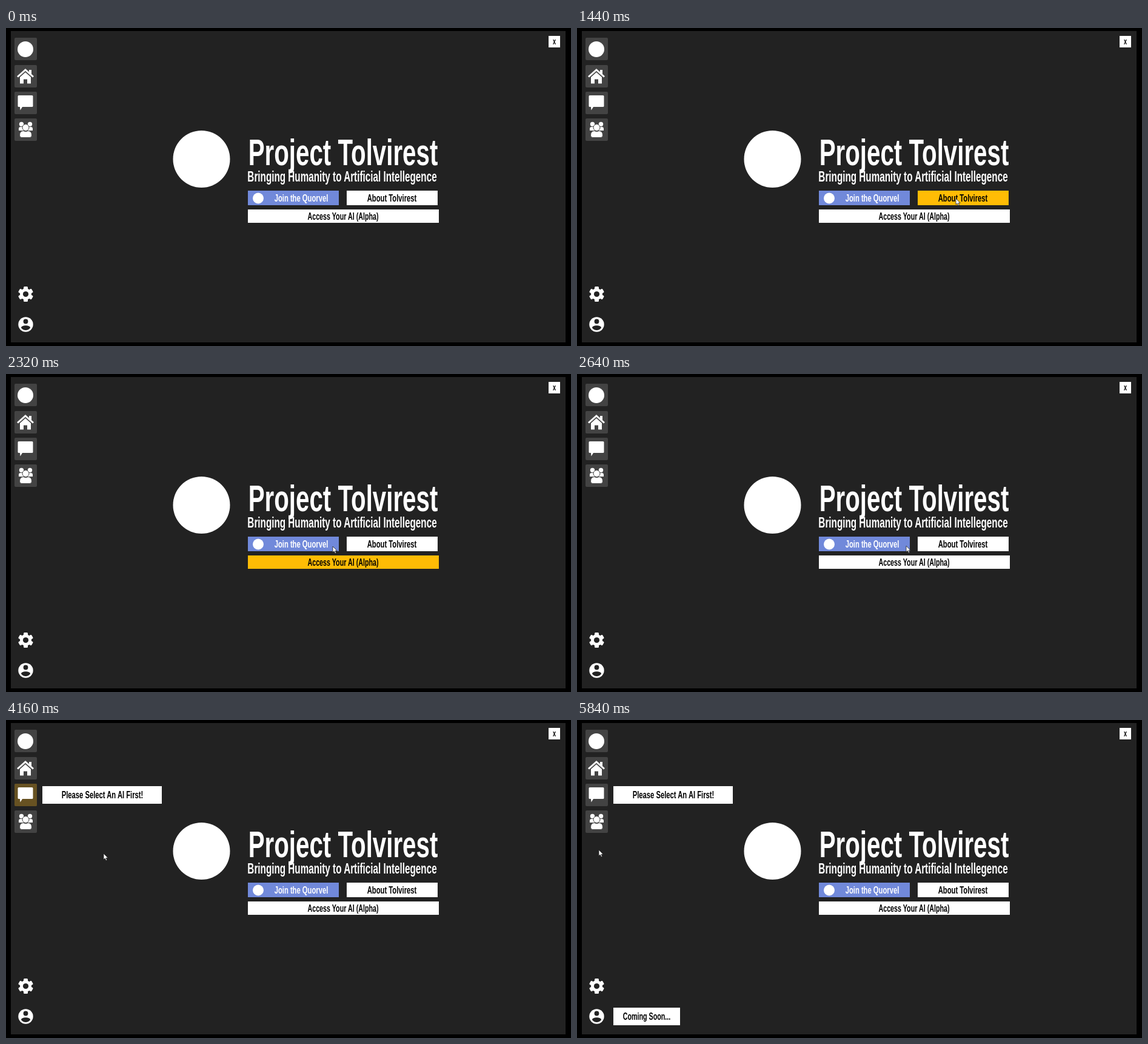
These frames come from a looping animation (932 px wide and 524 px high, 5.92 s). An HTML page without scripts:

```html
<!DOCTYPE html>
<html lang="en">
<head>
<meta charset="utf-8">
<title>Launcher</title>
<style>
  html, body { margin: 0; width: 100%; height: 100%; overflow: hidden; background: #000; }
  svg { display: block; width: 100vw; height: 100vh; }

  /* one condensed face for all lettering */
  text {
    font: bold 17.3px "Liberation Sans", Arial, sans-serif;
    text-anchor: middle;
    transform-box: fill-box;
    transform-origin: center;
    transform: scaleX(.65);
  }
  .title { font-size: 62px; }
  .tagline { font-size: 23.5px; }
  .wide { font-size: 16.5px; }
  .light { fill: #fff; }
  .panel { fill: #222; }
  .tile { fill: #434343; }
  .gold { fill: #ffbc05; }
  .tint { fill: #675222; }

  .cursor, .about, .access, .chat, .account, .tip1, .tip2 {
    animation: 5920ms step-end infinite;
  }
  .cursor { animation-name: cursor; }
  .about { animation-name: about; }
  .access { animation-name: access; }
  .chat { animation-name: chat; }
  .account { animation-name: account; }
  .tip1 { animation-name: tip1; }
  .tip2 { animation-name: tip2; }

  /* the pointer advances in 80 ms ticks */
  @keyframes cursor {
    0% { opacity: 0; transform: translate(639px, 27px); }
    10.811% { opacity: 1; transform: translate(639px, 27px); animation-timing-function: steps(5); }
    17.568% { transform: translate(608px, 289px); animation-timing-function: steps(3); }
    21.622% { transform: translate(622px, 283px); animation-timing-function: steps(2); }
    24.324% { transform: translate(625px, 281px); animation-timing-function: steps(5); }
    31.081% { transform: translate(591px, 323px); animation-timing-function: steps(2); }
    33.784% { transform: translate(586px, 321px); }
    35.135% { transform: translate(586px, 321px); animation-timing-function: steps(3); }
    39.189% { transform: translate(539px, 284px); animation-timing-function: steps(5); }
    45.946% { transform: translate(544px, 283px); }
    48.649% { transform: translate(544px, 283px); animation-timing-function: steps(3); }
    52.703% { transform: translate(145px, 145px); }
    56.757% { transform: translate(36px, 110px); animation-timing-function: steps(4); }
    62.162% { transform: translate(34px, 116px); }
    66.216% { transform: translate(34px, 116px); animation-timing-function: steps(3); }
    70.27% { transform: translate(161px, 220px); animation-timing-function: steps(3); }
    74.324% { transform: translate(125px, 389px); }
    77.027% { transform: translate(62px, 448px); }
    79.73% { transform: translate(30px, 484px); }
    87.838% { transform: translate(30px, 484px); animation-timing-function: steps(2); }
    90.541% { transform: translate(119px, 440px); }
    93.243% { transform: translate(122px, 435px); }
    94.595% { transform: translate(122px, 435px); animation-timing-function: steps(3); }
    98.649%, 100% { opacity: 1; transform: translate(36px, 214px); }
  }
  @keyframes about {
    0% { opacity: 0; }
    20.27% { opacity: 0; animation-timing-function: steps(3); }
    24.324% { opacity: 1; }
    25.676% { opacity: 1; animation-timing-function: steps(4); }
    31.081%, 100% { opacity: 0; }
  }
  @keyframes access {
    0% { opacity: 0; }
    27.027% { opacity: 0; animation-timing-function: steps(2); }
    29.73% { opacity: .6; }
    31.081% { opacity: .28; animation-timing-function: steps(2); }
    33.784% { opacity: 0; }
    35.135% { opacity: 0; animation-timing-function: steps(2); }
    37.838% { opacity: 1; }
    39.189% { opacity: 1; animation-timing-function: steps(4); }
    44.595%, 100% { opacity: 0; }
  }
  @keyframes chat {
    0% { opacity: 0; }
    56.757% { opacity: 0; animation-timing-function: steps(3); }
    60.811% { opacity: 1; }
    70.27% { opacity: 1; animation-timing-function: steps(3); }
    74.324%, 100% { opacity: 0; }
  }
  @keyframes account {
    0% { fill: #fff; }
    82.432% { fill: #fff; animation-timing-function: steps(3); }
    86.486% { fill: #ffbc05; }
    87.838% { fill: #ffbc05; animation-timing-function: steps(4); }
    93.243%, 100% { fill: #fff; }
  }
  @keyframes tip1 {
    0% { opacity: 0; }
    64.865%, 100% { opacity: 1; }
  }
  @keyframes tip2 {
    0% { opacity: 0; }
    83.784%, 100% { opacity: 1; }
  }
</style>
</head>
<body>
<svg viewBox="0 0 932 524">
  <defs>
    <rect id="tile" x="14" width="37" height="37" rx="2"/>
    <rect id="tooth" x="29" y="426" width="7" height="25" rx="1.5"/>
  </defs>
  <rect class="panel" x="8" y="5" width="915" height="513"/>

  <!-- sidebar -->
  <g class="tile">
    <use href="#tile" y="16"/>
    <use href="#tile" y="61"/>
    <use href="#tile" y="105"/>
    <use href="#tile" y="149"/>
  </g>
  <use class="tint chat" href="#tile" y="105"/>
  <g class="light">
    <circle cx="32" cy="35" r="13"/>
    <path d="M19 80.5L32 69l13 11.500" fill="none" stroke="#fff" stroke-width="3"/>
    <path d="M38 69h4v9l-4-3zM23 81l9-8 9 8v10.500h-6v-7h-6v7h-6z"/>
    <path d="M21 111h22q1.500 0 1.500 1.500v16q0 1.500-1.500 1.500H27l-3.500 5.500-.5-5.500h-2q-1.500 0-1.500-1.500v-16q0-1.500 1.500-1.500z"/>
    <circle cx="25.500" cy="158.500" r="3.700"/>
    <circle cx="39.500" cy="158.500" r="3.700"/>
    <path d="M21 169v-3q0-3 3-3h17q3 0 3 3v3z"/>
    <g stroke="#434343">
      <circle cx="32.500" cy="164" r="5.500"/>
      <path d="M22.500 177q0-7.500 6-7.500 4 2 8 0 6 0 6 7.500 0 3.500-3.500 3.500H26q-3.500 0-3.500-3.500z"/>
    </g>
    <circle cx="32.500" cy="438.500" r="9.500"/>
    <use href="#tooth"/>
    <use href="#tooth" transform="rotate(60 32.500 438.500)"/>
    <use href="#tooth" transform="rotate(120 32.500 438.500)"/>
    <circle class="account" cx="32.500" cy="488.500" r="12.200"/>
  </g>
  <g class="panel">
    <circle cx="32.500" cy="438.500" r="4.600"/>
    <circle cx="32.500" cy="483.500" r="3.900"/>
    <path d="M25 494c0-5 15-5 15 0-3.500 5.300-11.500 5.300-15 0z"/>
  </g>

  <!-- close button -->
  <rect class="light" x="895" y="13" width="19" height="19"/>
  <text x="904.500" y="27" style="font-size:14px">x</text>

  <!-- heading -->
  <g class="light">
    <circle cx="322.500" cy="216" r="47"/>
    <text class="title" x="556" y="226">Project Tolvirest</text>
    <text class="tagline" x="554.500" y="253">Bringing Humanity to Artificial Intellegence</text>
  </g>

  <!-- buttons -->
  <rect x="399" y="268" width="150" height="24" fill="#7189da"/>
  <circle class="light" cx="416" cy="280.500" r="9"/>
  <text class="light" x="487" y="286">Join the Quorvel</text>

  <rect class="light" x="562" y="268" width="150" height="24"/>
  <rect class="gold about" x="562" y="268" width="150" height="24"/>
  <text x="636.500" y="286">About Tolvirest</text>

  <rect class="light" x="399" y="299" width="315" height="22"/>
  <rect class="gold access" x="399" y="299" width="315" height="22"/>
  <text class="wide" x="556" y="316">Access Your AI (Alpha)</text>

  <!-- tooltips -->
  <g class="tip1">
    <rect class="light" x="60" y="109" width="197" height="29"/>
    <text x="159" y="129">Please Select An AI First!</text>
  </g>
  <g class="tip2">
    <rect class="light" x="60" y="474" width="110" height="29"/>
    <text class="wide" x="115" y="494">Coming Soon...</text>
  </g>

  <path class="cursor" d="M0 0v10l2.300-2.100 1.600 3.600 1.700-.7-1.600-3.500h3.200z" fill="#fff" stroke="#222" stroke-width=".8"/>
</svg>
</body>
</html>
```
